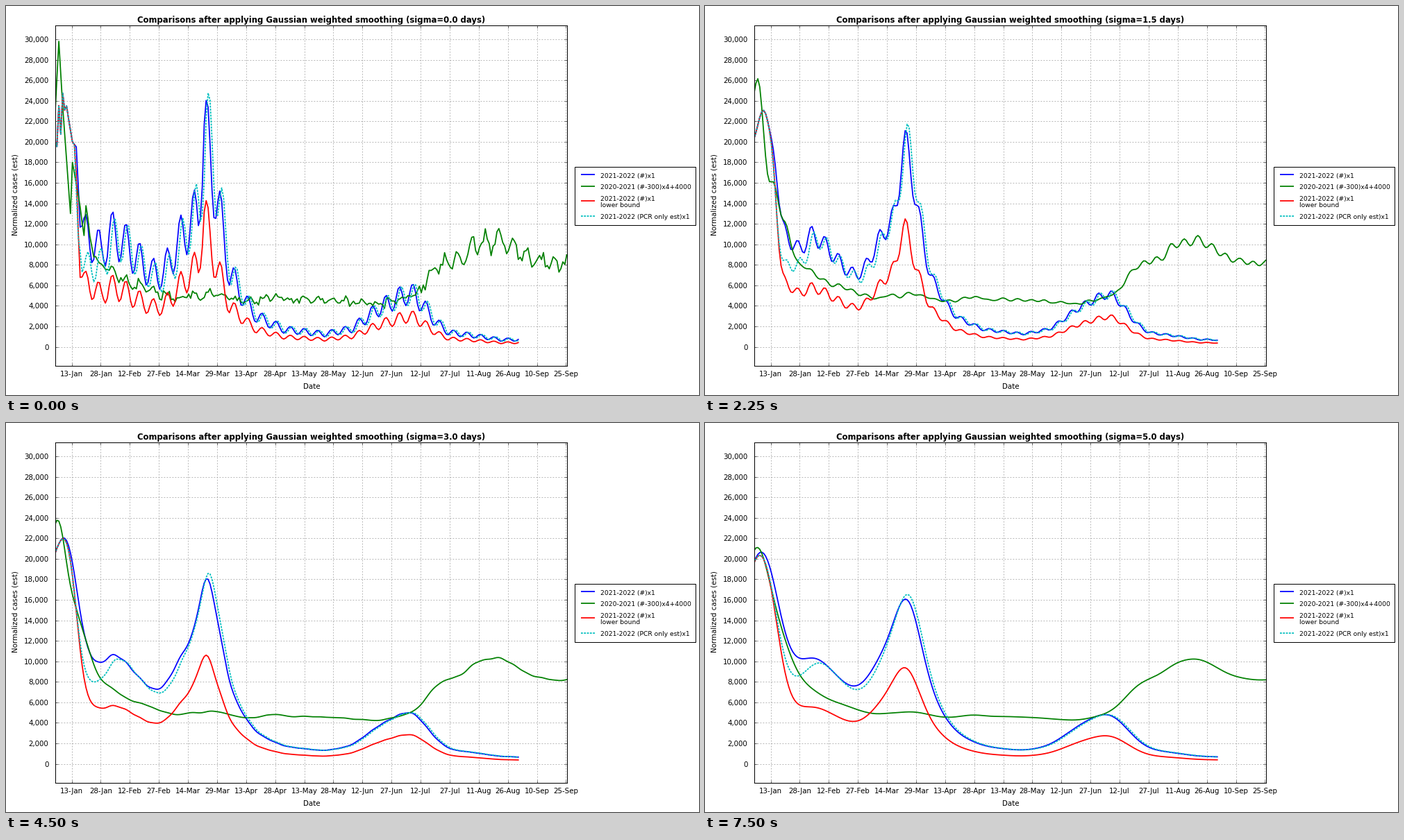
Write a matplotlib script that moves like this. It is 998x561 px and loops after 8 s.

```python
import numpy as np
import matplotlib.pyplot as plt
from matplotlib.animation import FuncAnimation
from matplotlib.ticker import StrMethodFormatter

W, H = 998, 561
BOX = 70.5, 27.5, 807.5, 518.5  # plot edges in pixels
LEAD = 14                       # days of data before the left edge
CASES_END, LAST = 239, 264      # last day of 2022 data, last day shown
STEPS = 11
LW = 1.75

plt.rcParams["font.family"] = "DejaVu Sans"

# Key points of each trend as (day, thousands of cases)
CASES = [
    (-14, 5), (-8, 11), (-4, 20), (0, 19.7), (4, 23.6), (6, 23.4), (9, 20),
    (11, 19.5), (13, 12), (16, 11.3), (24, 9.1), (28, 11), (34, 10.5),
    (42, 8.7), (50, 7.1), (56, 7.2), (65, 10.6), (74, 13.2), (77, 21.5),
    (80, 18.2), (85, 12.9), (90, 7.2), (99, 4.2), (104, 2.95), (118, 1.7),
    (139, 1.25), (153, 1.75), (167, 3.75), (181, 5.15), (186, 5), (196, 2.5),
    (203, 1.4), (216, 1.1), (230, .7)]
EARLIER = [
    (-14, 7), (-5, 14), (-2, 25), (0, 22.5), (2, 29.8), (4, 23.4), (8, 13),
    (9, 18), (13, 13.8), (15, 10.5), (16, 13), (22, 7.6), (25, 8.2), (36, 6.4),
    (60, 4.8), (80, 5.2), (98, 4.4), (115, 4.7), (148, 4.5), (165, 4.1),
    (187, 5.1), (195, 7.7), (209, 8.3), (215, 9.9), (229, 10.4), (244, 8.5),
    (264, 8)]

# Ratios to the main curve as (day, ratio)
LOWER = [(10, 1), (13, .58), (30, .53), (60, .55), (76, .62), (82, .54), (100, .57)]
PCR = [(10, 1), (12, .55), (16, .7), (26, .88), (34, 1), (62, .93), (72, 1.04),
       (100, 1)]

DATES = ("13-Jan 28-Jan 12-Feb 27-Feb 14-Mar 29-Mar 13-Apr 28-Apr 13-May "
         "28-May 12-Jun 27-Jun 12-Jul 27-Jul 11-Aug 26-Aug 10-Sep 25-Sep").split()


def interp(days, points):
    return np.interp(days, *zip(*points))


def weekly(days, size, peak):
    """Reporting cycle of seven days that fades in after the first wave."""
    fade = np.interp(days, [12, 18], [0, 1])
    return 1 + size * fade * np.cos(2 * np.pi * (days - peak) / 7)


def build_series():
    days = np.arange(-LEAD, CASES_END + 1)
    peak = interp(days, [(100, 1.7), (125, 2.6)])
    zigzag = 2 * np.cos(np.pi * days) * np.exp(-(days - 2.5) ** 2 / 4)
    cases = interp(days, CASES) * weekly(days, .22, peak) + zigzag
    lower = cases * interp(days, LOWER)
    pcr = np.where(days > 10, np.roll(cases, 1), cases) * interp(days, PCR)

    rng = np.random.default_rng(4)
    days = np.arange(-LEAD, LAST + 1)
    size = interp(days, [(40, .09), (90, .05), (185, .04), (198, .08)])
    peak = interp(days, [(60, 1.8), (130, 3), (200, 5.2)])
    noise = 1 + rng.normal(0, .04, len(days)) * (days > 18)
    earlier = interp(days, EARLIER) * weekly(days, size, peak) * noise
    return [1000 * s for s in (cases, earlier, lower, pcr)]


def smooth(values, sigma):
    if sigma == 0:
        return values
    days = np.arange(len(values))
    weights = np.exp(-.5 * ((days[:, None] - days) / sigma) ** 2)
    return weights @ values / weights.sum(axis=1)


def dashes(on, off, width):
    return (0, (on / width, off / width))


fig = plt.figure(figsize=(W / 72, H / 72), dpi=72, facecolor="white")

# Pixel-space layer for the legend and captions
ui = fig.add_axes([0, 0, 1, 1])
ui.set(xlim=(0, W), ylim=(H, 0))
ui.axis("off")

x0, y0, x1, y1 = BOX
ax = fig.add_axes([x0 / W, 1 - y1 / H, (x1 - x0) / W, (y1 - y0) / H])
ax.set(xlim=(0, LAST), ylim=(-1826, 31384))
ax.set_xticks(8.6 + 15 * np.arange(len(DATES)), DATES)
ax.set_yticks(range(0, 30001, 2000))
ax.yaxis.set_major_formatter(StrMethodFormatter("{x:,.0f}"))
ax.tick_params(direction="in", top=True, right=True, length=4, width=.5,
               labelsize=10.3)
ax.tick_params(axis="x", pad=8)
ax.tick_params(axis="y", pad=9)
ax.grid(color="#a0a0a0", lw=.8, ls=dashes(1.8, 2.2, .8))
ax.set_axisbelow(True)
for spine in ax.spines.values():
    spine.set_linewidth(1)

title = ui.text(440, 23.7, "", size=11.6, weight="bold", ha="center")
ui.text(440, 552.5, "Date", size=10.3, ha="center")
ui.text(14, 272, "Normalized cases (est)", size=10.3, rotation=90,
        ha="center", va="center")

styles = [("#0000ff", "-"), ("#008000", "-"), ("#ff0000", "-"),
          ("#00bfbf", dashes(2.8, 1.5, LW))]
ui.add_patch(plt.Rectangle((819.5, 231.5), 174, 84, fc="white", ec="black", lw=1))
for (color, ls), y in zip(styles, (243, 260, 281, 303)):
    ui.plot([828, 848], [y, y], color=color, ls=ls, lw=LW,
            solid_capstyle="butt")
for text, y in [("2021-2022 (#)x1", 247.5), ("2020-2021 (#-300)x4+4000", 264),
                ("2021-2022 (#)x1", 281), ("lower bound", 290),
                ("2021-2022 (PCR only est)x1", 307)]:
    ui.text(856, y, text, size=9.1)

series = build_series()
sigmas = np.arange(STEPS) / 2
curves = [[smooth(s, sigma)[LEAD:] for s in series] for sigma in sigmas]
lines = [ax.plot(np.arange(len(c)), c, color=color, ls=ls, lw=LW)[0]
         for c, (color, ls) in zip(curves[0], styles)]


def update(frame):
    step = frame // 3
    title.set_text("Comparisons after applying Gaussian weighted smoothing "
                   f"(sigma={sigmas[step]:.1f} days)")
    for line, curve in zip(lines, curves[step]):
        line.set_ydata(curve)
    return [title, *lines]


anim = FuncAnimation(fig, update, frames=32, interval=250, repeat=True,
                     repeat_delay=0, blit=False)
plt.show()
```
